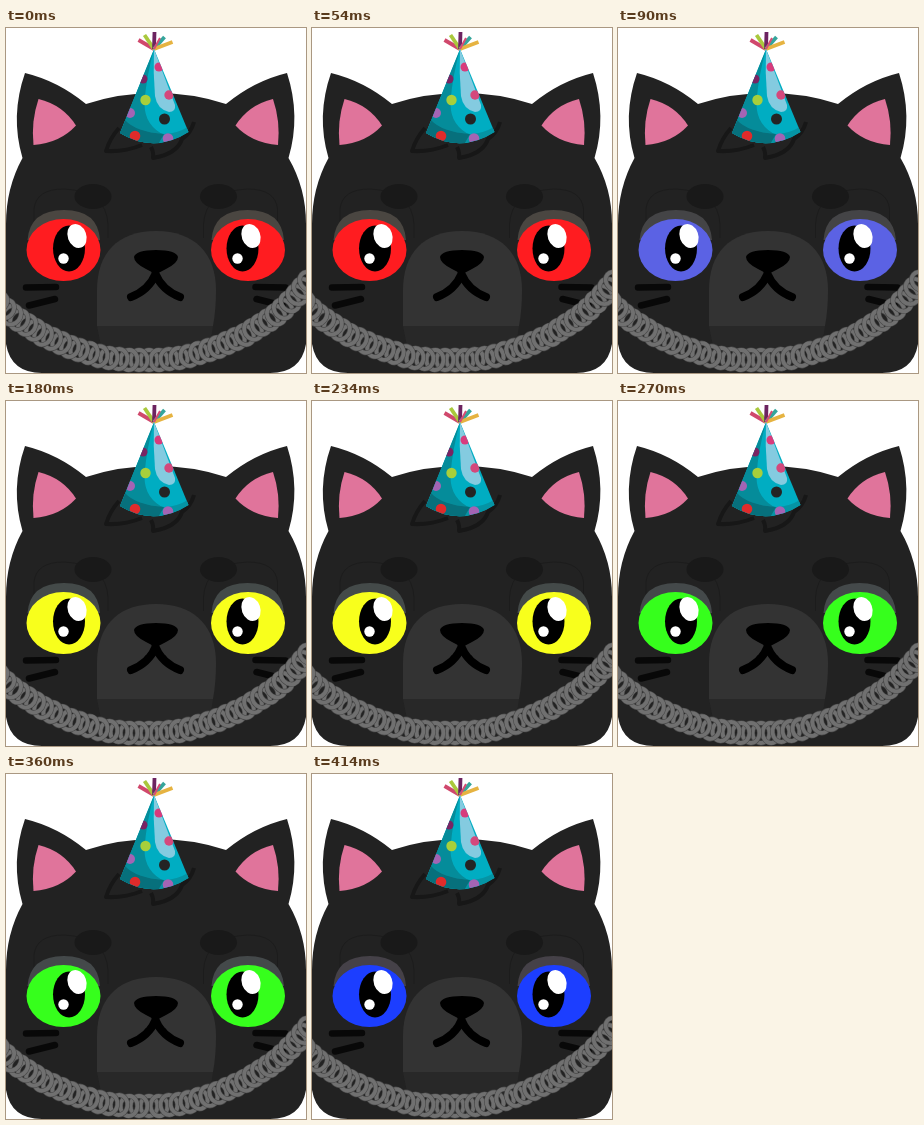
These frames come from a looping animation (300x345 px, 0.45 s). An HTML page without scripts:

```html
<!DOCTYPE html>
<html lang="en">
<head>
<meta charset="utf-8">
<title>Party cat</title>
<style>
  html, body { margin: 0; width: 100%; height: 100%; overflow: hidden; background: #fff; }
  svg { display: block; width: 300px; height: 345px; }
  .iris { animation: iris 450ms step-end infinite; }
  .lid { animation: lid 450ms step-end infinite; }
  /* stops sit a hair early so each change lands on its 90 ms beat */
  @keyframes iris {
    0% { fill: #ff1c20; }
    19.99% { fill: #5b62e4; }
    39.99% { fill: #f8ff1c; }
    59.99% { fill: #36ff1c; }
    79.99% { fill: #1c3eff; }
  }
  @keyframes lid {
    0% { fill: #4a4641; }
    19.99% { fill: #444446; }
    39.99% { fill: #444a49; }
    59.99% { fill: #44494a; }
    79.99% { fill: #454148; }
  }
</style>
</head>
<body>
<svg viewBox="0 0 300 345">
  <defs>
    <clipPath id="cone"><path d="M148 21L114 105Q148 126 182.500 104Z"/></clipPath>
    <marker id="link" markerUnits="userSpaceOnUse" markerWidth="28" markerHeight="28" viewBox="-14 -14 28 28" orient="auto">
      <g fill="none">
        <ellipse rx="8.500" ry="10" stroke="#484848" stroke-width="5"/>
        <ellipse rx="8.500" ry="10" stroke="#707070" stroke-width="3.800"/>
      </g>
    </marker>
    <!-- half of the chain, from its lowest point outwards -->
    <polyline id="chain" fill="none" marker-mid="url(#link)" points="-10 0 0 0 10 0 20 -1 30 -2 40 -4 50 -7 60 -10 69 -13 78 -17 87 -21 96 -25 104 -30 112 -35 120 -40 127 -45 134 -51 141 -58 148 -65 154 -72 160 -79 166 -86"/>
    <!-- left half of the face, mirrored for the right -->
    <g id="side">
      <path d="M32.500 71Q57 77 70 97.500Q54 115 27.500 117Q25 93 32.500 71Z" fill="#e0749b"/>
      <path d="M28 203V181Q30 161 58 161Q100 163 102 196V210" fill="none" stroke="#1c1c1c"/>
      <ellipse cx="87" cy="168.500" rx="18.500" ry="12.500" fill="#191919"/>
      <path class="lid" d="M21.500 212Q24 182 58 182T94 212Z"/>
      <ellipse class="iris" cx="57.500" cy="222" rx="37" ry="31"/>
      <ellipse cx="63" cy="220.500" rx="16" ry="23"/>
      <path d="M20 259.500L50 259M23 277.500L49 271" fill="none" stroke="#080808" stroke-width="6.500" stroke-linecap="round"/>
    </g>
    <g id="shine" fill="#fff">
      <ellipse cx="71" cy="208" rx="9.300" ry="12.300" transform="rotate(-20 71 208)"/>
      <circle cx="57.500" cy="230.500" r="5.200"/>
    </g>
  </defs>

  <path d="M19 45Q52 53 80 76Q113 65 150 65T220 76Q248 53 281 45Q295 88 282.500 130Q300 160 300 196V316Q295 345 264 345H36Q5 345 0 316V196Q0 160 16.500 130Q4 88 19 45Z" fill="#222"/>

  <path d="M113 100Q104 110 100 123Q119 124 136 117M145 119Q148 125 147 130Q171 126 176 111Q185 105 188 94" fill="none" stroke="#171717" stroke-width="4" stroke-linejoin="round"/>

  <path d="M91 298V262C91 226 111 203 150 203S210 226 210 262Q210 282 207 298Z" fill="#333"/>
  <path d="M91 298H207L204 318Q150 334 95 318Z" fill="#282828"/>

  <use href="#side"/>
  <use href="#side" transform="matrix(-1 0 0 1 299.500 0)"/>
  <use href="#shine"/>
  <use href="#shine" x="174"/>

  <path d="M128 229Q130 222 150 222T172 229Q172 235 160 241Q150 248 140 241Q128 235 128 229Z"/>
  <path d="M149.500 239V246Q143 262 125 269M149.500 246Q156 262 174 269" fill="none" stroke="#000" stroke-width="8" stroke-linecap="round" stroke-linejoin="round"/>

  <g fill="none" stroke-width="3.800">
    <path d="M148 21L132.500 12" stroke="#d0486c"/>
    <path d="M148 21L138.500 7" stroke="#a9c83c"/>
    <path d="M148 21L148.500 4" stroke="#6c2360"/>
    <path d="M148 21L158.500 9" stroke="#34a59b"/>
    <path d="M148 21L166.500 14" stroke="#e6b341"/>
    <path d="M148 21L154 10" stroke="#d94b75" stroke-width="2"/>
  </g>
  <g clip-path="url(#cone)">
    <rect x="110" y="20" width="78" height="100" fill="#00adc2"/>
    <path d="M148 21L112 108H160Q138 98 138.500 75Q140 50 148 21Z" fill="#058c9a"/>
    <path d="M119 92Q130 104 158 106Q170 106 182 99L188 120H110Z" fill="#0594a4"/>
    <path d="M119 92Q130 104 158 106L150 120H108Z" fill="#07707c"/>
    <path d="M148 21L169 77Q170 84 163 84Q151 81 149 68Q147 45 148 21Z" fill="#84cbe0"/>
    <circle cx="137" cy="51" r="4.500" fill="#792463"/>
    <circle cx="153" cy="39" r="4.500" fill="#d83b7c"/>
    <circle cx="163" cy="67" r="4.700" fill="#d4487c"/>
    <circle cx="139.500" cy="72" r="5.200" fill="#a8cf3b"/>
    <circle cx="158.500" cy="91" r="5.500" fill="#242424"/>
    <circle cx="124" cy="85" r="5" fill="#a464b4"/>
    <circle cx="129" cy="108" r="5.300" fill="#e02b2b"/>
    <circle cx="162" cy="110.500" r="5.300" fill="#a464b4"/>
  </g>

  <use href="#chain" transform="translate(143 332)"/>
  <use href="#chain" transform="matrix(-1 0 0 1 133 332)"/>
</svg>
</body>
</html>
```
